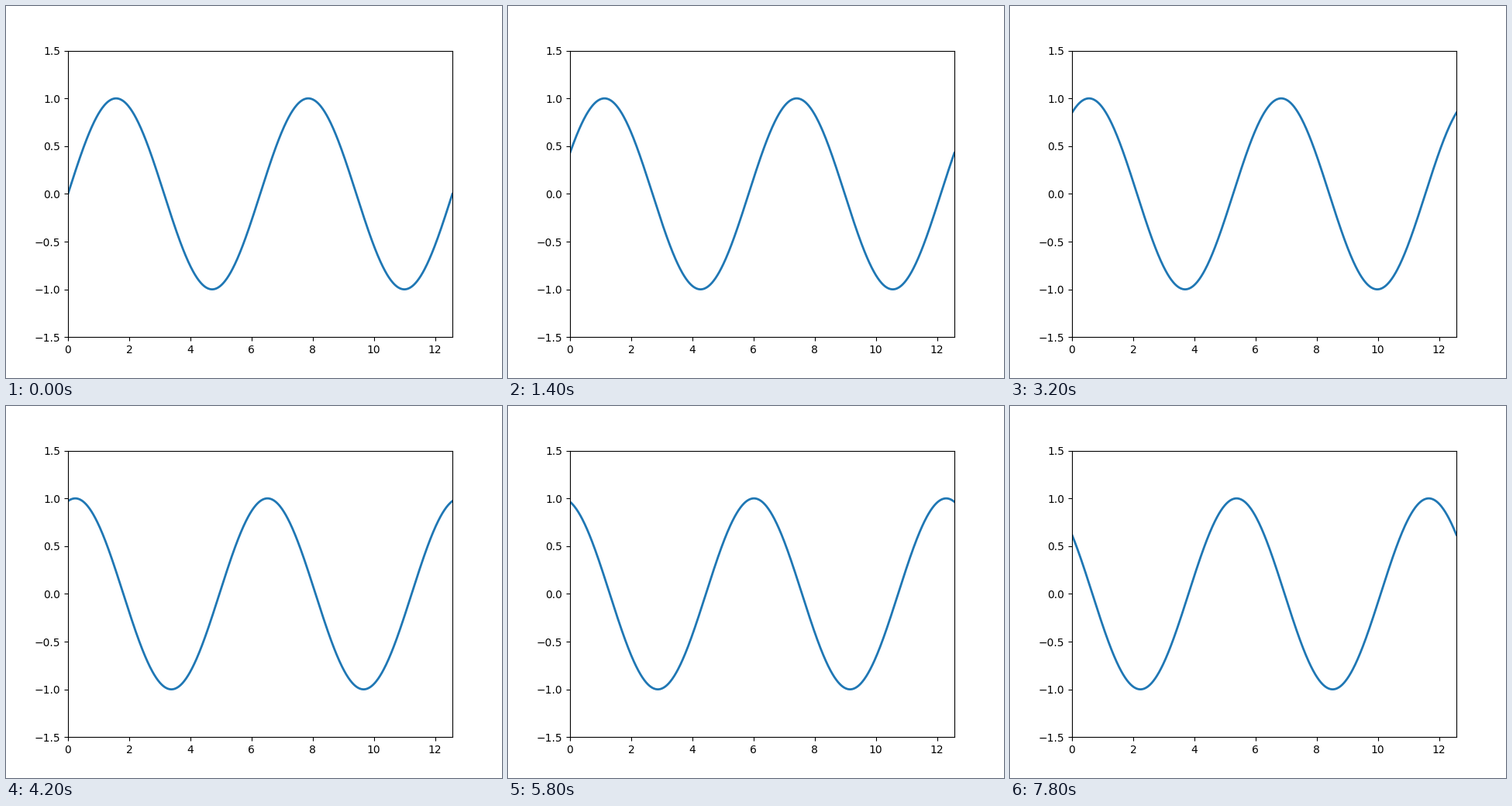
Animation of 640x480 px, one loop 8000 ms. Source, as a matplotlib script:

```python
import numpy as np
import matplotlib.pyplot as plt
from matplotlib.animation import FuncAnimation

FRAMES = 40
INTERVAL = 200  # ms
PHASE_STEP = 2 * np.pi / 99

x = np.linspace(0, 4 * np.pi, 1000)

fig, ax = plt.subplots(figsize=(6.4, 4.8), dpi=100)
ax.set_xlim(0, 4 * np.pi)
ax.set_ylim(-1.5, 1.5)
line, = ax.plot(x, np.sin(x), color="#1f77b4", lw=2)


def update(frame):
    line.set_ydata(np.sin(x + frame * PHASE_STEP))
    return line,


anim = FuncAnimation(fig, update, frames=FRAMES, interval=INTERVAL,
                     repeat=True, repeat_delay=0)
plt.show()
```
